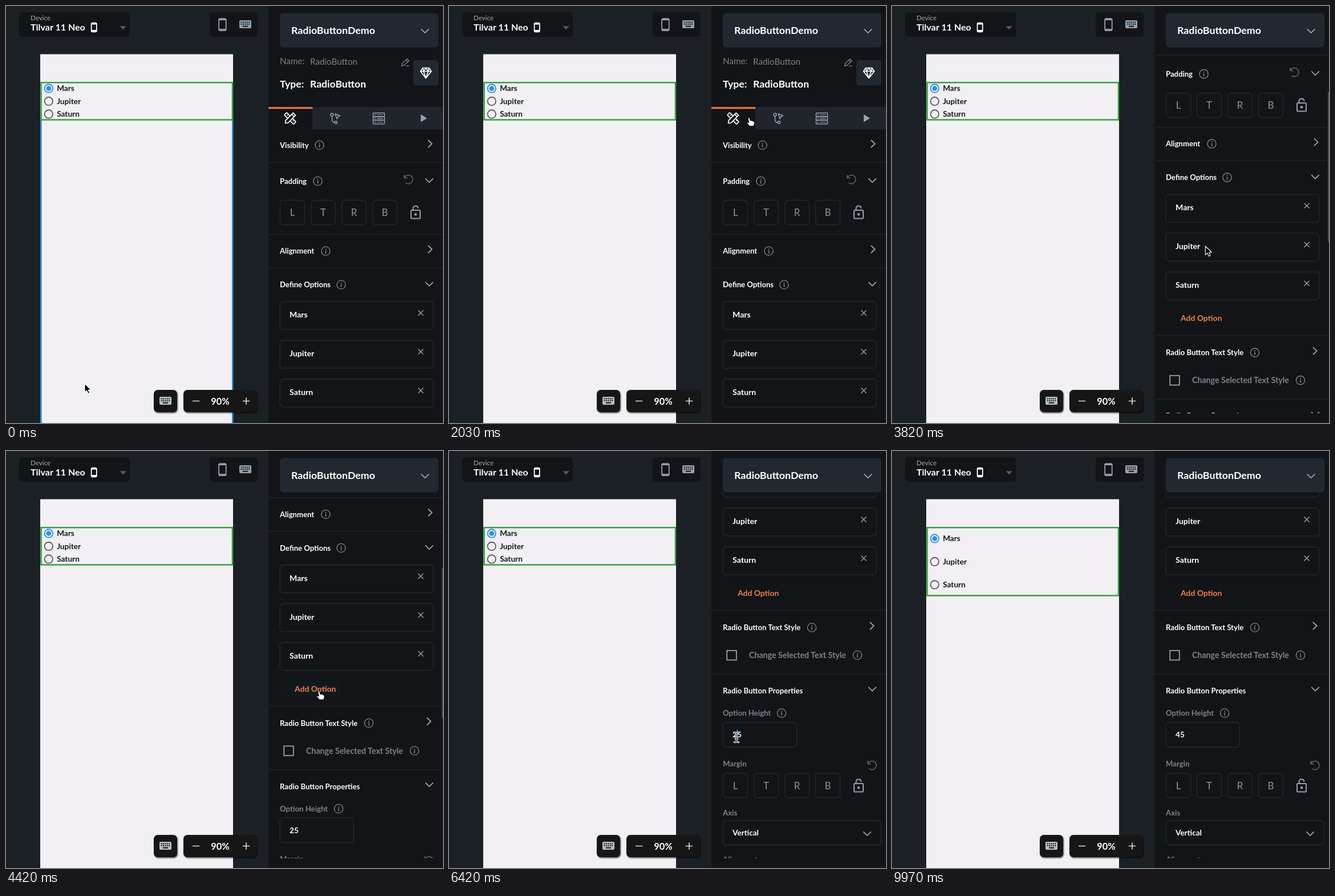
Recreate the animation shown at these times as an HTML page. Size 766x731 px, loop 10000 ms.

```html
<!DOCTYPE html>
<html lang="en">
<head>
<meta charset="utf-8">
<title>Radio button option height</title>
<style>
  html, body { margin: 0; width: 100%; height: 100%; overflow: hidden; background: #1b2025; }
  svg { display: block; width: 766px; height: 731px; font-family: Lato, "Open Sans", sans-serif; }
</style>
</head>
<body>
<svg id="stage" viewBox="0 0 766 731" xmlns="http://www.w3.org/2000/svg"></svg>
<script>
const LOOP = 10000;
const C = {
  back: '#1b2025', panel: '#121417', raised: '#22282f', tabs: '#1f252b', line: '#24292e',
  white: '#ffffff', grey: '#79838c', icon: '#95a1ac', orange: '#ee7f50', bar: '#e2733f',
  blue: '#2490ee', green: '#389f3c', page: '#f2f0f4'
};
const PLANETS = ['Mars', 'Jupiter', 'Saturn'];

// ---- markup helpers ----
const text = (x, y, size, str, fill = C.white, weight = 700, anchor = 'start') =>
  `<text x="${x}" y="${y}" font-size="${size}" font-weight="${weight}" fill="${fill}" text-anchor="${anchor}">${str}</text>`;
const box = (x, y, w, h, r, fill, stroke = 'none', sw = 1) =>
  `<rect x="${x}" y="${y}" width="${w}" height="${h}" rx="${r}" fill="${fill}" stroke="${stroke}" stroke-width="${sw}"/>`;
const line = (d, stroke, w = 1.6, fill = 'none') =>
  `<path d="${d}" fill="${fill}" stroke="${stroke}" stroke-width="${w}" stroke-linecap="round" stroke-linejoin="round"/>`;
const at = (x, y, inner) => `<g transform="translate(${x} ${y})">${inner}</g>`;
const frame = (x, y, w, h) => box(x + .5, y + .5, w - 1, h - 1, 6, 'none', C.line, 1.3);
const rule = y => `<rect x="460" y="${y}" width="306" height="1.2" fill="#22272c"/>`;
const heading = (y, str) => text(480, y + 4.8, 13.1, str);
const label = (y, str) => text(480, y + 4.8, 13.2, str, C.grey);

const info = (x, y) => at(x, y,
  `<circle r="7.6" fill="none" stroke="${C.grey}" stroke-width="1.4"/>` +
  `<circle cy="-3.3" r="1" fill="${C.grey}"/>` + line('M0-.6V3.8', C.grey, 1.6));
const right = (x, y) => at(x, y, line('M-3.2-6L3.2 0L-3.2 6', C.icon, 1.8));
const down = (x, y) => at(x, y, line('M-6.3-3.2L0 3.2L6.3-3.2', C.icon, 1.8));
const cross = (x, y) => at(x, y, line('M-4.2-4.2L4.2 4.2M4.2-4.2L-4.2 4.2', C.icon, 1.4));
const undo = (x, y) => at(x, y, line('M-7.5-7.5V-2.5H-2.5M-7.2-2.8A7.6 7.6 0 1 1-4.6 6.2', '#5d666e', 1.5));
const lock = (x, y) => at(x, y,
  box(-8, -4, 16, 14.5, 1.5, 'none', C.icon, 2) + line('M-4.5-4V-7A4.5 4.5 0 0 1 4.4-8', C.icon, 2) +
  `<circle cy="3.2" r="2.2" fill="${C.icon}"/>`);
const phoneIcon = (x, y, w, h, col) => at(x, y,
  box(-w / 2, -h / 2, w, h, 2, 'none', col, 1.8) +
  `<path d="M${-w / 2} ${-h / 2 + 1.6}H${w / 2}M${-w / 2} ${h / 2 - 2}H${w / 2}" stroke="${col}" stroke-width="2.4"/>`);
function keyboard(x, y, col) {
  let keys = '';
  for (let r = 0; r < 2; r++)
    for (let i = 0; i < 5; i++) keys += box(-7.9 + i * 3.4, -4.6 + r * 3.4, 2, 2, 0, C.panel);
  return at(x, y, box(-10.5, -7, 21, 14, 2, col) + keys + box(-4.6, 2.6, 9.2, 2, 0, C.panel));
}
const sides = (y, lockY) => 'LTRB'.split('').map((s, i) =>
  frame(480 + i * 54, y, 44, 44) + text(502 + i * 54, y + 28.3, 17, s, '#8b959e', 400, 'middle')).join('') + lock(718, lockY);

function tabIcons() {
  const tools = at(498, 197,
    `<g transform="rotate(45)">${box(-11.5, -3, 23, 6, 1, 'none', C.white, 1.7)}${line('M-7-3V0M-3-3V-.5M3-3V-.5M7-3V0', C.white, 1.2)}</g>` +
    `<g transform="rotate(-45)">${line('M-12 0L-8-3H10.5V3H-8ZM7-3V3', C.white, 1.7, C.panel)}</g>`);
  const route = at(577, 197,
    `<circle cx="-5.5" cy="-6.5" r="2.4" fill="none" stroke="${C.icon}" stroke-width="1.5"/>` +
    line('M-5.5-4V2Q-5.5 7-1 7', C.icon, 1.5) +
    `<circle cx="1.4" cy="7" r="2.2" fill="none" stroke="${C.icon}" stroke-width="1.5"/>` +
    line('M0-8L8.5-4.5L4.8-3L3.2 1Z', C.icon, 1.4));
  let store = '';
  for (let i = 0; i < 3; i++)
    store += box(-10, -9.5 + i * 6.4, 20, 6.4, 1, 'none', C.icon, 1.5) +
      `<circle cx="-6.5" cy="${-6.3 + i * 6.4}" r="1" fill="${C.icon}"/>` + line(`M-3 ${-6.3 + i * 6.4}H6.5`, C.icon, 1.1);
  return tools + route + at(653.5, 197, store) + `<path d="M727 190L738 196.7L727 203.4Z" fill="${C.icon}"/>`;
}

const gem = at(736, 117.5, line('M-5.5-9H5.5L9.5-3L0 9L-9.5-3ZM-9.5-3H9.5M-4-3L0 9L4-3L0-9L-4-3M-5.5-9L-4-3M5.5-9L4-3', C.white, 1.7));
const pencil = at(700, 99, line('M-6.5 6L-5.5 1.5L3-6.2L6.3-3L-2.2 5ZM.8-4.2L4-1M1.5 6.2H6.5', C.grey, 1.3));

function leftSide() {
  return box(23, 11, 194, 43, 5, C.panel) + text(43, 25, 11.6, 'Device', '#a3adb6', 400) +
    text(43, 43, 16, 'Tilvar 11 Neo') + phoneIcon(154.2, 37.5, 9.2, 15.5, C.white) +
    `<path d="M199.5 35.3H211L205.2 41.2Z" fill="#535b63"/>` +
    box(357, 11, 84, 43, 5, C.panel) + phoneIcon(379.4, 32.6, 12.6, 21, C.icon) + keyboard(419.5, 32, C.icon) +
    `<rect x="60" y="84.5" width="338" height="647" fill="${C.page}"/>` +
    `<g id="edges"><rect x="60" y="200" width="2.6" height="531" fill="${C.blue}"/>` +
    `<rect x="396" y="200" width="2.4" height="531" fill="${C.blue}"/></g>` +
    PLANETS.map((p, i) => `<g class="radio">` +
      `<circle r="7.2" fill="none" stroke="${i ? '#5a5a5c' : C.blue}" stroke-width="1.8"/>` +
      (i ? '' : `<circle r="4.3" fill="${C.blue}"/>`) + text(14.4, 4.7, 13.6, p, '#17181a') + '</g>').join('') +
    `<rect id="outline" x="61.6" y="134.2" width="335.4" fill="none" stroke="${C.green}" stroke-width="2.5"/>` +
    `<g filter="url(#shade)">${box(259, 673, 41, 39, 7, C.panel)}${box(311, 673, 129, 39, 7, C.panel)}</g>` +
    keyboard(279.5, 692, '#b7bfc6') + line('M327.5 692.5H338.5M415.5 692.5H426.5M421 687V698', '#d5dade', 1.7) +
    text(375.5, 698.6, 16.4, '90%', C.white, 700, 'middle');
}

function panelContent() {
  return text(480, 101.8, 15.2, 'Name:', C.grey, 400) + text(533, 102.5, 15.2, 'RadioButton', C.grey, 400) + pencil +
    box(714, 95, 44, 44, 5, C.raised) + gem +
    text(480, 142.5, 17.6, 'Type:') + text(533, 142.5, 17.6, 'RadioButton') +
    `<rect x="537" y="177" width="229" height="39.5" fill="${C.tabs}"/><rect x="460" y="177" width="77.3" height="3.4" fill="${C.bar}"/>` + tabIcons() +
    heading(244, 'Visibility') + info(549.5, 244) + right(743.5, 241.5) + rule(273.5) +
    heading(307, 'Padding') + info(546.5, 307) + undo(705.5, 304) + down(742, 306) + sides(340, 362) + rule(400) +
    heading(429.5, 'Alignment') + info(560.5, 429.5) + right(743.5, 426.5) + rule(458.5) +
    heading(488.5, 'Define Options') + info(587.5, 488.5) + down(742, 487.5) +
    PLANETS.map((p, i) => frame(479.5, 517.5 + i * 68, 270, 50) + text(497, 546 + i * 68, 14.1, p) + cross(727, 538 + i * 68)).join('') +
    `<rect id="hover" x="480" y="721" width="106" height="29" rx="4" fill="#11191c"/>` +
    text(506, 740, 13.9, 'Add Option', C.orange) + rule(765) +
    heading(795.5, 'Radio Button Text Style') + info(636, 795.5) + right(741.5, 792.5) +
    box(487.2, 835.8, 16.6, 16.6, 0, 'none', C.icon, 1.8) + text(526, 849, 14.2, 'Change Selected Text Style', C.grey) + info(716, 844) + rule(876.5) +
    heading(906.5, 'Radio Button Properties') + down(742, 903.5) +
    label(945.5, 'Option Height') + info(583, 945.5) + frame(479.5, 961, 130.5, 44.5) +
    `<text id="value" x="497" y="988" font-size="13.6" font-weight="700" fill="#fff"></text>` +
    `<rect id="caret" y="974.5" width="1.9" height="18.5" fill="${C.blue}"/>` +
    label(1034, 'Margin') + undo(741.5, 1037) + sides(1050.5, 1073) +
    label(1120, 'Axis') + frame(479.5, 1133.5, 278.5, 43.5) + text(497, 1160, 13.5, 'Vertical') + down(733, 1157) +
    label(1202, 'Alignment');
}

const pointers =
  `<path id="arrow" d="M0 0V15.2L3.5 12L6 17.6L8.6 16.5L6.1 11H11Z" fill="#000" stroke="#fff" stroke-width="1.1" stroke-linejoin="round"/>` +
  `<path id="hand" d="M-1.6 1.2Q-.2-.8 1.2 1.2L2.2 5.6Q4 4.4 4.9 6Q6.6 5.2 7.3 6.8Q9.2 6.4 9.3 8.6Q9.6 11.6 7.9 15H.6Q-1.4 11.8-4 9.4Q-3.8 7.4-.4 9Z" fill="#fff" stroke="#111" stroke-width="1" stroke-linejoin="round"/>` +
  `<g id="beam">${['#fff', '#111'].map((c, i) => line('M-4-8Q0-8 0-5.5Q0-8 4-8M0-5.5V6.5M-4 9Q0 9 0 6.5Q0 9 4 9M-2 3.5H2', c, i ? 1 : 2.8)).join('')}</g>`;

const stage = document.getElementById('stage');
stage.innerHTML =
  `<defs><clipPath id="view"><rect x="460" y="72" width="306" height="642"/></clipPath>` +
  `<filter id="shade" x="-20%" y="-40%" width="140%" height="200%"><feDropShadow dx="1" dy="1.5" stdDeviation="1.3" flood-color="#000" flood-opacity=".7"/></filter></defs>` +
  `<rect width="766" height="731" fill="${C.back}"/>` + leftSide() +
  `<rect x="460" width="306" height="731" fill="${C.panel}"/>` +
  `<g clip-path="url(#view)"><g id="content">${panelContent()}</g></g>` +
  box(480, 12.5, 278, 60, 6, C.raised) + text(500, 48.5, 17.8, 'RadioButtonDemo') + down(734.5, 44) +
  `<rect id="thumb" x="764" width="2" height="264" rx="1" fill="#454c53"/>` +
  `<g id="pointer">${pointers}</g>`;

// ---- motion ----
const el = Object.fromEntries([...stage.querySelectorAll('[id]')].map(n => [n.id, n]));
const radios = stage.querySelectorAll('.radio');
const set = (n, k, v) => n.setAttribute(k, v);
const show = (n, on) => set(n, 'visibility', on ? 'inherit' : 'hidden');
const ramp = (t, a, b) => Math.min(1, Math.max(0, (t - a) / (b - a)));
const ease = (t, a, b) => { const p = ramp(t, a, b); return p * p * (3 - 2 * p); };

// time, x, y
const PATH = [
  [450, 138, 662], [1180, 400, 337], [1330, 400, 337], [2030, 526, 195.5], [2360, 528, 198],
  [2960, 547, 468], [3360, 549.5, 421], [5450, 548, 421], [5950, 510, 512], [6250, 504, 501.5], [6700, 504, 501.5]
];
function pointerAt(t) {
  let i = 1;
  while (i < PATH.length - 1 && t > PATH[i][0]) i++;
  const [a, b] = [PATH[i - 1], PATH[i]], p = ease(t, a[0], b[0]);
  return [a[1] + (b[1] - a[1]) * p, a[2] + (b[2] - a[2]) * p];
}
const inside = (x, y, l, t, r, b) => x >= l && x <= r && y >= t && y <= b;
const valueAt = (t, cut, add) => t < cut ? 25 : t < add ? 5 : 45;

function draw(t) {
  const scroll = 318.5 * ease(t, 3440, 4120) + 167.5 * ease(t, 4430, 5300);
  set(el.content, 'transform', `translate(0 ${-scroll})`);
  set(el.thumb, 'y', 73 + scroll * 641 / 1556);
  set(el.thumb, 'opacity', ramp(t, 3440, 3740) * (1 - ramp(t, 5850, 6150)));
  set(el.edges, 'opacity', 1 - ramp(t, 30, 120));

  // the preview follows the field after a short delay
  const value = valueAt(t, 6700, 7550), step = .9 * valueAt(t, 7230, 8100);
  el.value.textContent = value;
  set(el.outline, 'height', 3 * step - 2.2);
  radios.forEach((r, i) => set(r, 'transform', `translate(74.8 ${133.2 + step * (i + .5)})`));

  const blink = (t + 880) % 1000;
  set(el.caret, 'x', value === 5 ? 496 : 504.2);
  set(el.caret, 'opacity', t < 6150 ? 0 : 1 - ramp(blink, 500, 650) + ramp(blink, 850, 1000));

  const [x, y] = pointerAt(t), cy = y + scroll;
  const onAdd = inside(x, cy, 480, 721, 586, 750);
  const onHand = onAdd || inside(x, cy, 460, 177, 766, 216);
  const onField = inside(x, cy, 480, 961, 610, 1005);
  set(el.pointer, 'transform', `translate(${x} ${y})`);
  show(el.pointer, t < 6700);
  show(el.hand, onHand);
  show(el.beam, onField);
  show(el.arrow, !onHand && !onField);
  show(el.hover, onAdd);
}

function tick() {
  draw(performance.now() % LOOP);
  requestAnimationFrame(tick);
}
tick();
</script>
</body>
</html>
```
